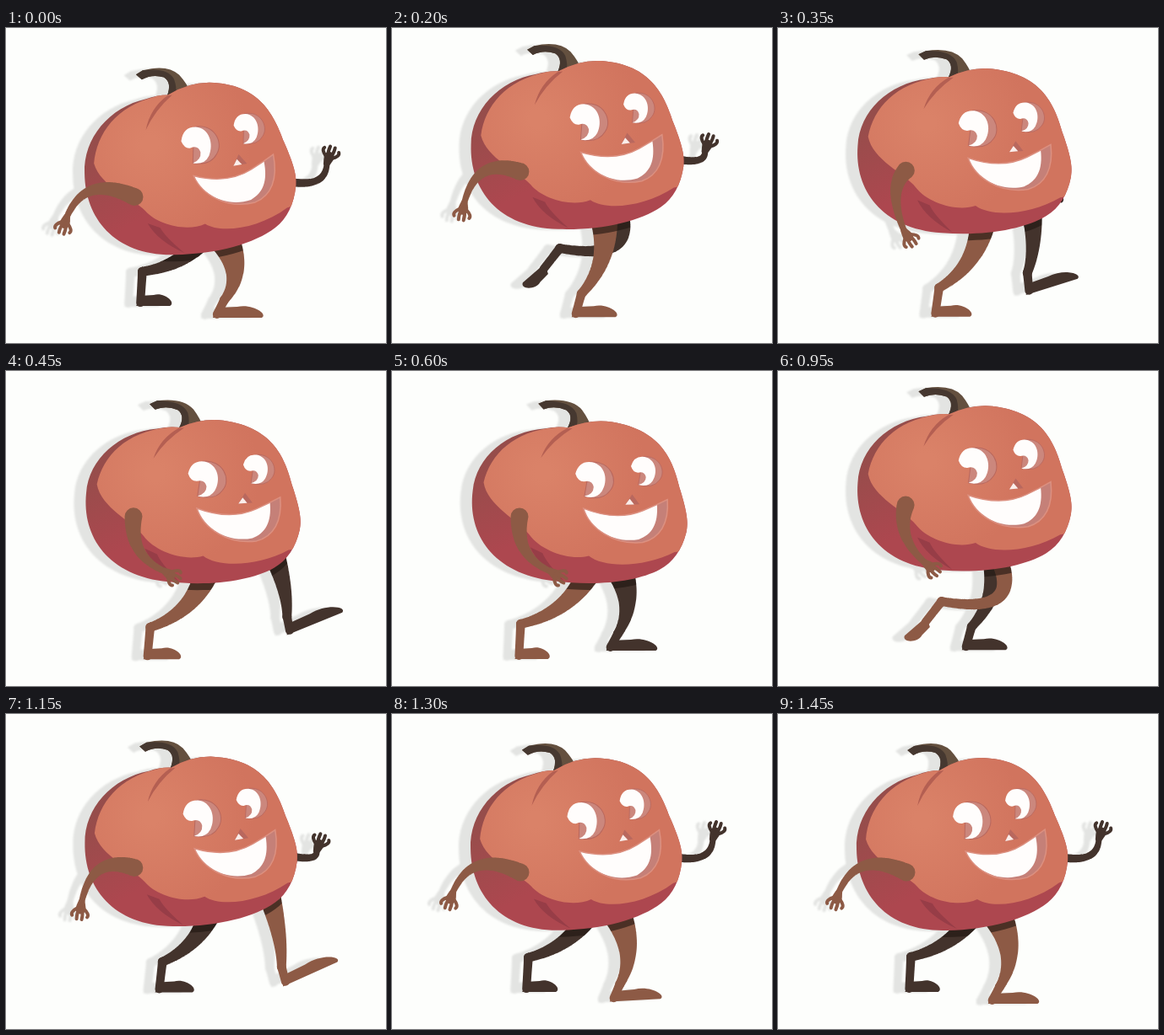
Recreate the animation shown at these times as an HTML page with a canvas. Size 450 by 374 pixels, loop 1500 ms.

```html
<!DOCTYPE html>
<html lang="en">
<head>
<meta charset="utf-8">
<title>Walking pumpkin</title>
<style>
html, body { margin: 0; width: 100%; height: 100%; overflow: hidden; background: #fdfefc; }
canvas { display: block; filter: drop-shadow(-14px 1px 1px rgba(0, 0, 0, .1)); }
</style>
</head>
<body>
<canvas id="stage" width="450" height="374"></canvas>
<script>
const ctx = document.getElementById('stage').getContext('2d');
const LOOP = 1500, STEP = 50, TAU = 2 * Math.PI;
const NEAR = '#8d5a45', FAR = '#43332c';

const BODY = new Path2D(`M93 160 C91 118 122 81 165 71 Q178 66 191 66 Q215 51 240 51
  C300 52 317 90 329 122 C340 147 344 160 343 173 C341 195 333 212 319 223
  C295 242 250 255 200 256 C130 258 94 214 93 160Z`);
const LIGHT = new Path2D(`M176 68 C130 80 107 112 104 148 C112 176 150 188 165 204
  C180 221 215 229 236 219 C255 231 300 224 333 199 L365 190 V40 H200Z`);
const STEM = new Path2D(`M153 42 L161 37 Q190 29 204 42 Q214 53 217 62 L190 67
  Q196 51 186 45 Q172 41 160 48Z`);
const STEM_SHADE = new Path2D(`M153 42 L161 37 Q190 33 198 47 Q202 58 200 65 L190 67
  Q196 51 186 45 Q172 41 160 48Z`);
const CREASE = new Path2D('M190 67 Q170 82 165 108 Q176 84 196 66Z');
const FOLD = new Path2D('M168 219 Q180 240 212 254 Q188 234 183 224Z');
const MOUTH = new Path2D('M222 162 Q262 172 290 154 Q304 145 316 136 C322 165 314 185 295 193 C262 202 232 185 222 162Z');
const TEETH = new Path2D('M222 162 Q262 172 290 154 L305 144 C310 168 304 182 290 190 C262 200 232 185 222 162Z');
const NOSE = new Path2D('M275 136 L269 150 L285 147Z');
const NOSE_HOLE = new Path2D('M273 142 L269 150 L279 148Z');
const EYE_WALL = new Path2D('M-7 -22 C16 -28 29 -4 20 10 Q13 24 -8 21Z');
const EYE_HOLE = new Path2D(`M-22 -5 Q-20 -22 -5 -22 C11 -21 17 -2 11 12 Q6 23 -8 21
  Q2 17 1 8 Q-2 -1 -11 3 Q-18 4 -22 -5Z`);

// Shoulder, elbow, wrist and fingertips at both ends of the swing
const NEAR_ARM = {
  back: [[152, 187], [94, 159], [72, 211], [65, 232]],
  front: [[151, 172], [146, 219], [188, 237], [208, 250]]
};
const FAR_ARM = {
  back: [[335, 169], [379, 177], [380, 147], [388, 125]],
  front: [[310, 172], [318, 190], [300, 190], [296, 208]]
};

const skin = ctx.createRadialGradient(170, 125, 10, 170, 125, 120);
skin.addColorStop(0, '#da8268');
skin.addColorStop(1, '#d1745e');
const rind = ctx.createLinearGradient(95, 130, 150, 220);
rind.addColorStop(0, '#964d4b');
rind.addColorStop(1, '#ad474f');

const clamp = v => Math.min(1, Math.max(0, v));
const ease = u => u * u * (3 - 2 * u);
const mix = (a, b, u) => a + (b - a) * u;
const bump = (u, from, to) => Math.sin(Math.PI * clamp((u - from) / (to - from))) ** 2;

// The body rises once per step and drops sharply as a foot takes the weight
function bobAt(t) {
  const u = t / LOOP * 2 % 1;
  return 1 - 17 * bump(u, .02, .62) + 12.5 * Math.exp(-20 * u);
}

function fill(path, color) {
  ctx.fillStyle = color;
  ctx.fill(path);
}

// Limb along a quadratic curve, its radius going from r0 to r1
function taper([x0, y0], [x1, y1], [x2, y2], r0, r1) {
  ctx.beginPath();
  for (let i = 0; i <= 70; i++) {
    const u = i / 70, v = 1 - u;
    const x = v * v * x0 + 2 * u * v * x1 + u * u * x2;
    const y = v * v * y0 + 2 * u * v * y1 + u * u * y2;
    const r = mix(r1, r0, v ** 1.3);
    ctx.moveTo(x + r, y);
    ctx.arc(x, y, r, 0, TAU);
  }
  ctx.fill();
}

function drawLeg(t, color) {
  // First half of the cycle on the ground, second half in the air
  const cycle = (t / LOOP + 1 / 15) % 1;
  const air = Math.max(0, cycle * 2 - 1);
  const back = cycle < .5 ? ease(cycle * 2) : 1 - ease(air);
  const tuck = bump(air, .15, .6), kick = bump(air, .45, .92);

  const ball = [255 - 106 * back - 12 * tuck + 105 * kick, 340 - 2 * back - 42 * tuck - 22 * kick];
  const ankle = [ball[0] + 9 - 7 * back + 15 * tuck - 12 * kick,
    ball[1] - 16 - 22 * back + 6 * tuck + 4 * kick];
  const hip = [260 - 27 * back + 20 * tuck + 60 * kick, 238 + bobAt(t) - 20 * kick];
  const knee = [(hip[0] + ankle[0]) / 2 + 25 - 10 * back + 45 * tuck - 15 * kick,
    (hip[1] + ankle[1]) / 2 + 4 + 14 * back + 30 * tuck];
  const length = 54 - 20 * back - 12 * tuck + 17 * kick;

  ctx.fillStyle = color;
  taper(hip, knee, ankle, 18 - 4 * back - 5 * tuck - 4 * kick, 5.5);
  taper(ankle, ankle, ball, 5.5, 5);
  ctx.save();
  ctx.translate(...ball);
  ctx.rotate(2.5 * tuck - .43 * kick);
  ctx.beginPath();
  ctx.moveTo(-5, 4);
  ctx.lineTo(length, 4);
  ctx.bezierCurveTo(length + 8, 0, length * .8, -13, length * .45, -9);
  ctx.lineTo(0, -8);
  ctx.fill();
  ctx.restore();
}

function drawArm(arm, t, color, radius) {
  const swing = clamp(.5 + .9 * Math.cos(TAU * (t - 680) / LOOP));
  const drop = 24 * Math.sin(Math.PI * swing);
  const [shoulder, elbow, wrist, tip] = arm.back.map(([x, y], i) =>
    [mix(x, arm.front[i][0], swing), mix(y, arm.front[i][1], swing) + (i > 1 ? drop : 0)]);

  ctx.save();
  ctx.translate(0, bobAt(t));
  ctx.fillStyle = ctx.strokeStyle = color;
  taper(shoulder, elbow, wrist, radius, 3.5);
  ctx.translate(...wrist);
  ctx.rotate(Math.atan2(tip[1] - wrist[1], tip[0] - wrist[0]));
  taper([0, 0], [4, 0], [8, 0], 4, 6);
  ctx.lineWidth = 4;
  ctx.lineCap = 'round';
  ctx.beginPath();
  for (const y of [-9, -3, 3, 9]) {
    ctx.moveTo(7, y * .4);
    ctx.quadraticCurveTo(13, y * 1.3, 22 - Math.abs(y) * .6, y);
  }
  ctx.stroke();
  ctx.restore();
}

function drawEye(x, y, scale) {
  ctx.save();
  ctx.translate(x, y);
  ctx.scale(scale, scale);
  fill(EYE_WALL, '#cb877d');
  ctx.strokeStyle = '#b9685e';
  ctx.stroke(EYE_WALL);
  fill(EYE_HOLE, '#fffdfc');
  ctx.restore();
}

function drawBody() {
  fill(BODY, rind);
  ctx.save();
  ctx.clip(BODY);
  fill(LIGHT, skin);
  fill(CREASE, '#b45f52');
  fill(FOLD, '#973d47');
  ctx.restore();
  drawEye(229, 126, 1);
  drawEye(287, 106, .82);
  fill(NOSE, '#b9685e');
  fill(NOSE_HOLE, '#fbeeea');
  fill(MOUTH, '#c58078');
  fill(TEETH, '#fffdfc');
  ctx.strokeStyle = '#dc9080';
  ctx.lineWidth = 1.5;
  ctx.stroke(MOUTH);
}

function drawStem() {
  fill(STEM, '#64503f');
  fill(STEM_SHADE, '#463830');
}

// Draws in the frame of the body, which leans forward once per loop
function inBody(t, dy, draw) {
  const lean = (1 - Math.cos(TAU * (t + 100) / LOOP)) / 2;
  ctx.save();
  ctx.translate(218 + 6 * lean, 153 + bobAt(t) + dy);
  ctx.rotate(.148 * lean);
  ctx.scale(1 + .03 * lean, 1 - .04 * lean);
  ctx.translate(-218, -153);
  draw();
  ctx.restore();
}

function frame(now) {
  const t = Math.floor(now % LOOP / STEP) * STEP;
  ctx.clearRect(0, 0, 450, 374);
  drawArm(FAR_ARM, t, FAR, 5);
  ctx.save();
  ctx.translate(5, -12);
  drawLeg((t + LOOP / 2) % LOOP, FAR);
  ctx.restore();
  drawLeg(t, NEAR);
  // The body darkens the tops of the legs
  ctx.globalCompositeOperation = 'source-atop';
  inBody(t, 8, () => fill(BODY, 'rgba(30, 20, 15, .6)'));
  ctx.globalCompositeOperation = 'source-over';
  inBody(t, 0, drawStem);
  inBody(t, 0, drawBody);
  drawArm(NEAR_ARM, t, NEAR, 10.5);
  requestAnimationFrame(frame);
}
requestAnimationFrame(frame);
</script>
</body>
</html>
```
